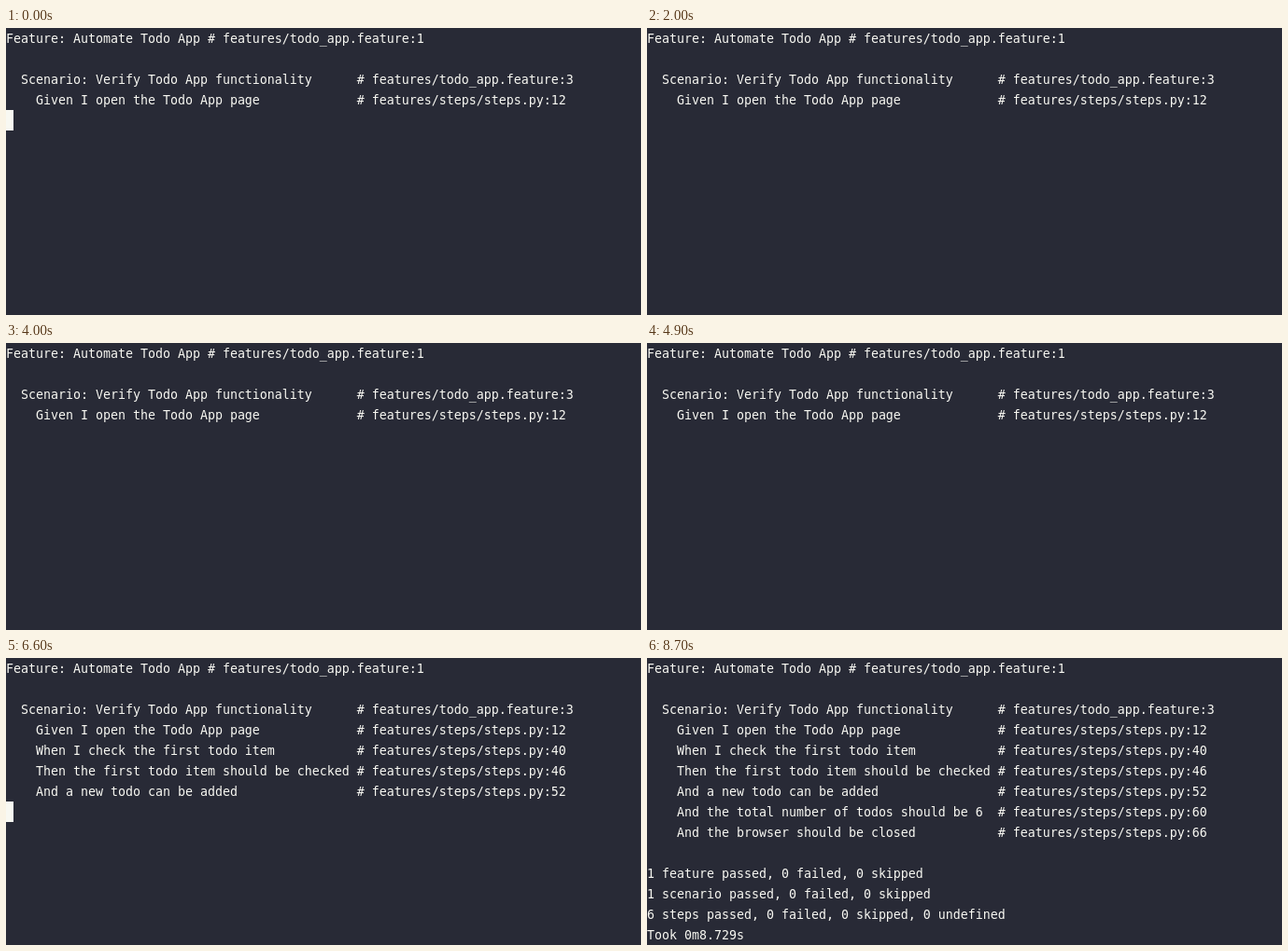
Write an HTML page that moves like this. It is 680 px wide and 308 px high and loops after 9.8 s.

```html
<!DOCTYPE html>
<html lang="en">
<head>
<meta charset="utf-8">
<title>Test run</title>
<style>
  html, body { margin: 0; width: 100%; height: 100%; overflow: hidden; background: #282a36; }
  svg { display: block; fill: #f8f8f2; }
  text {
    font: 13.29px "DejaVu Sans Mono", "Noto Sans Mono", monospace;
    font-variant-ligatures: none;
    white-space: pre;
  }
</style>
</head>
<body>
<svg id="screen" width="680" height="308">
  <rect id="cursor" width="8" height="22"/>
</svg>
<script>
const LOOP = 9800, ROW = 22, BASELINE = 16, NOTE_COLUMN = 47;
const screen = document.getElementById("screen");
const cursor = document.getElementById("cursor");

const noted = (text, note) => text.padEnd(NOTE_COLUMN) + "# features/" + note;
const step = (text, line) => noted("    " + text, "steps/steps.py:" + line);

const rows = [
  "Feature: Automate Todo App # features/todo_app.feature:1",
  "",
  noted("  Scenario: Verify Todo App functionality", "todo_app.feature:3"),
  step("Given I open the Todo App page", 12),
  step("When I check the first todo item", 40),
  step("Then the first todo item should be checked", 46),
  step("And a new todo can be added", 52),
  step("And the total number of todos should be 6", 60),
  step("And the browser should be closed", 66),
  "",
  "1 feature passed, 0 failed, 0 skipped",
  "1 scenario passed, 0 failed, 0 skipped",
  "6 steps passed, 0 failed, 0 skipped, 0 undefined",
  "Took 0m8.729s"
].map((line, i) => {
  const row = document.createElementNS(screen.namespaceURI, "text");
  row.setAttribute("y", i * ROW + BASELINE);
  row.textContent = line;
  return screen.appendChild(row);
});

// [start ms, visible rows]
const output = [[0, 4], [6400, 5], [6500, 6], [6600, 7], [7500, 14]];
// [on ms, off ms]
const blinks = [[0, 200], [2300, 2600], [4700, 4900], [6400, 7500]];

const show = (el, on) => { el.style.visibility = on ? "visible" : "hidden"; };

function draw(now) {
  const t = now % LOOP;
  const count = output.filter(([start]) => t >= start).pop()[1];
  rows.forEach((row, i) => show(row, i < count));
  cursor.setAttribute("y", count * ROW);
  show(cursor, blinks.some(([on, off]) => t >= on && t < off));
}

function tick() {
  draw(performance.now());
  requestAnimationFrame(tick);
}
tick();
</script>
</body>
</html>
```
